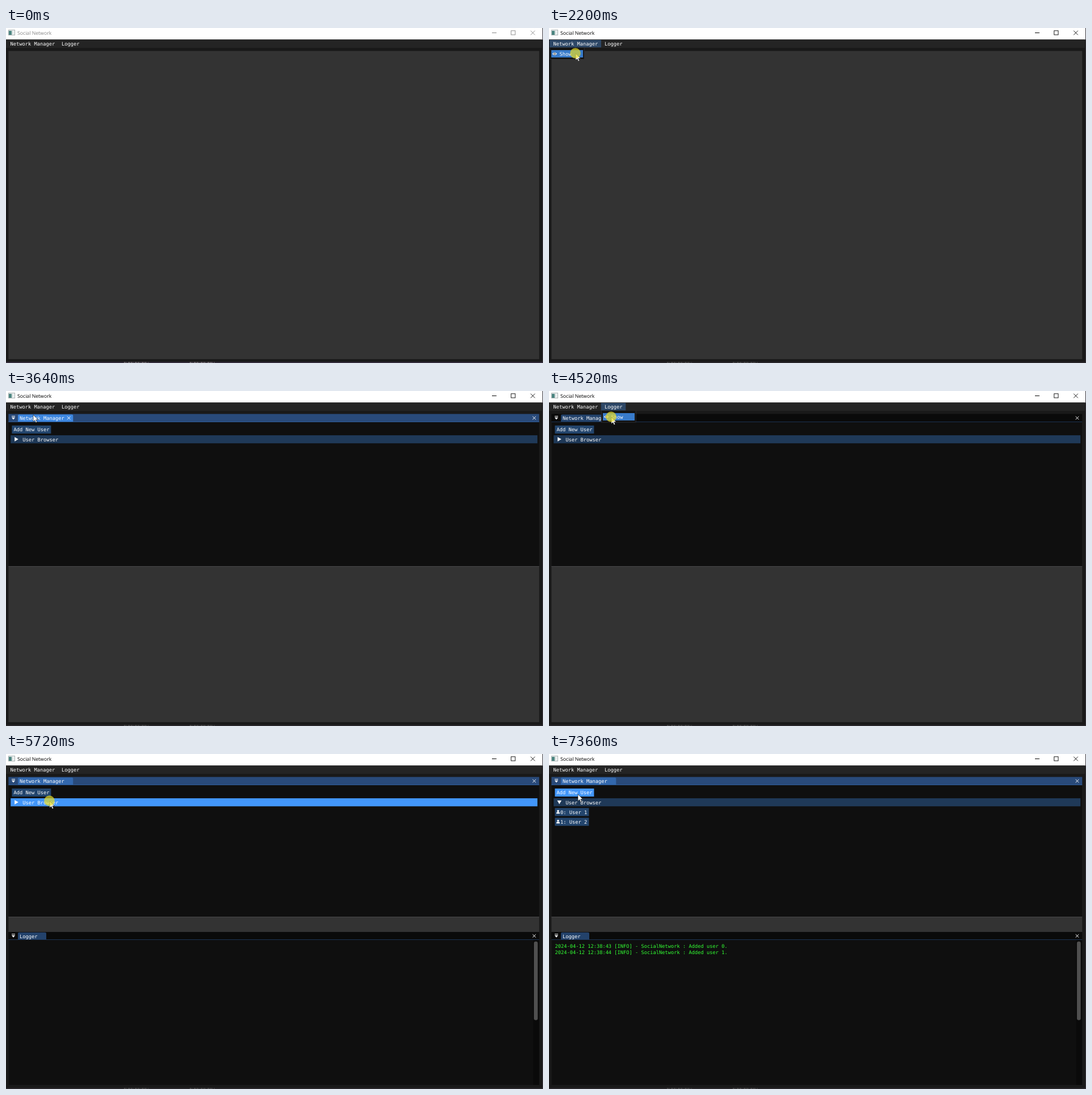
These frames come from a looping animation (947x591 px, 8000 ms). An HTML page:

```html
<!DOCTYPE html>
<html lang="en">
<head>
<meta charset="utf-8">
<title>Social Network</title>
<style>
  html, body { margin: 0; width: 100%; height: 100%; overflow: hidden; background: #191919; }
  svg { display: block; width: 947px; height: 591px; }
  text { font: 8.72px "DejaVu Sans Mono", monospace; fill: #fff; white-space: pre; text-rendering: geometricPrecision; }
  .title { font: 8.7px "Open Sans", sans-serif; }
  .log { fill: #3f3; }
</style>
</head>
<body>
<svg id="stage" viewBox="0 0 947 591"></svg>
<script>
const LOOP = 8000;
const TICK = 80;   // pointer sampling, ms
const ROW = 17.2;  // distance between widget rows
const BOX = 14.2;  // widget height
const stage = document.getElementById('stage');

// Pointer moves: start, end, goal
const entry = { x: 960, y: 650 };
const moves = [
  { from: 280, to: 1000, x: 57, y: 26 },
  { from: 1520, to: 1800, x: 47, y: 45 },
  { from: 2720, to: 2920, x: 50, y: 70 },
  { from: 3320, to: 3400, x: 50, y: 78 },
  { from: 3640, to: 3640, x: 48, y: 42 },
  { from: 3720, to: 3920, x: 110, y: 28 },
  { from: 4200, to: 4320, x: 110, y: 46 },
  { from: 4720, to: 5440, x: 77, y: 83 },
  { from: 6120, to: 6280, x: 51, y: 71 }
];

// Clicks: press and release
const click = {
  managerMenu: [1200, 1320], managerShow: [2200, 2400],
  loggerMenu: [4000, 4120], loggerShow: [4520, 4640],
  expand: [5720, 5920], addFirst: [6400, 6520], addSecond: [7240, 7360]
};

const color = {
  hover: '#387bcb', open: '#2d4766', bright: '#4296fa', pressed: '#0f87fa',
  button: '#23456d', header: '#1f3958', body: '#0f0f0f', dock: '#333', edge: '#4a4a4c',
  bar: '#294a7a', barIdle: '#0a0a0a', tab: '#3368ad', tabIdle: '#23426b', tabHover: '#3d87e0'
};

const rect = (x, y, w, h, fill, more = '') =>
  `<rect x="${x}" y="${y}" width="${w}" height="${h}" fill="${fill}" ${more}/>`;
const text = (x, y, s, more = '') => `<text x="${x}" y="${y}" ${more}>${s}</text>`;
const path = (d, fill = '#fff', stroke = 'none', width = 1) =>
  `<path d="${d}" fill="${fill}" stroke="${stroke}" stroke-width="${width}"/>`;
const circle = (x, y, r, fill, more = '') => `<circle cx="${x}" cy="${y}" r="${r}" fill="${fill}" ${more}/>`;
const cross = (x, y, r, stroke = '#fff', width = 1) =>
  path(`M${x - r} ${y - r}l${2 * r} ${2 * r}m0 ${-2 * r}l${-2 * r} ${2 * r}`, 'none', stroke, width);

function pointerAt(t) {
  let at = entry;
  for (const { from, to, x, y } of moves) {
    if (t < from) break;
    const steps = Math.round((to - from) / TICK) + 1;
    const done = Math.min(1, (Math.floor((t - from) / TICK) + 1) / steps);
    const k = Math.sin(done * Math.PI / 2);
    at = { x: at.x + (x - at.x) * k, y: at.y + (y - at.y) * k };
  }
  return at;
}

function titleBar(active) {
  const ink = active ? '#000' : '#858585';
  return rect(0, 0, 946, 20.4, '#fff') +
    rect(4, 3, 12, 10, '#a9b2b2') + rect(5, 4, 10, 8, '#eef2f2') +
    rect(5, 5, 5, 7, '#4c8580') + rect(11, 5, 1, 6, '#c4cccc') +
    text(20, 12, 'Social Network', `class="title" style="fill:${ink}"`) +
    rect(857, 8, 8, 1, ink) +
    rect(890.8, 4.8, 7.2, 7.2, 'none', `stroke="${ink}" stroke-width=".9"`) +
    cross(929, 8.5, 3.8, ink, .9);
}

function desktopEdge(active) {
  const scrap = x => `<path d="M${x} 590h44" stroke="${active ? '#666' : '#a29b9b'}" stroke-dasharray="3 1 1 2 4 1"/>`;
  return rect(0, 589, 947, 2, active ? '#29272b' : '#332d3b') + scrap(208) + scrap(324) +
    rect(946, 0, 1, 591, '#39373d');
}

function popup(x, hovered) {
  return rect(x, 35, 61.5, 20.5, '#36363c') + rect(x + .75, 35, 60, 19.75, '#131313') +
    (hovered ? rect(x + 3, 39, 56, 13, color.hover) : '') +
    path(`M${x + 5} 45.5q4 -5 8 0q-4 5 -8 0`) +
    circle(x + 9, 45.5, 1.5, '#fff', 'stroke="#131313" stroke-width=".8"') +
    text(x + 17.5, 48.5, 'Show');
}

// Docked panel: title strip, tab, body
function panel(y, bottom, label, tabEnd, focused, tabHovered) {
  const tabFill = tabHovered ? color.tabHover : focused ? color.tab : color.tabIdle;
  const base = y + BOX - .75;
  return rect(4.3, y, 936, bottom - y, color.body) +
    rect(4.3, y, 936, BOX, focused ? color.bar : color.barIdle) +
    path(`M21 ${base}V${y + 3}q0 -2 2 -2H${tabEnd - 2}q2 0 2 2V${base}z`, tabFill) +
    rect(4.3, base, 936, .75, focused ? color.tab : color.tabIdle) +
    rect(10, y + 3.5, 6, 1, '#fff') +
    path(`M9.8 ${y + 6}h6.4l-3.2 4z`) +
    text(24, y + 10.7, label) +
    (tabHovered ? cross(tabEnd - 7.5, y + 7.1, 2.8) : '') +
    cross(931.5, y + 7.1, 2.8);
}

function userButton(i) {
  const y = 60.9 + ROW * (i + 2);
  return rect(10.4, y, 60, BOX, color.button) +
    circle(16, y + 5.2, 1.8, '#fff') +
    path(`M13 ${y + 10}v-1q0 -2 3 -2t3 2v1z`) +
    text(20, y + 10.4, `${i}: User ${i + 1}`);
}

function scene(t) {
  const { x: px, y: py } = pointerAt(t);
  const over = (x, y, w, h) => px >= x && px < x + w && py >= y && py < y + h;
  const during = (a, b) => t >= a && t < b;
  const pressed = Object.values(click).some(([a, b]) => during(a, b));

  const managerAt = click.managerShow[1], loggerAt = click.loggerShow[1];
  const managerMenu = during(click.managerMenu[0], managerAt);
  const loggerMenu = during(click.loggerMenu[0], loggerAt);
  const managerOn = t >= managerAt, loggerOn = t >= loggerAt;
  const settling = during(loggerAt, loggerAt + TICK);  // first layout pass of the new panel
  const free = !managerMenu && !loggerMenu && !settling;
  const managerFocused = !during(click.loggerMenu[0], click.expand[0]);
  const active = t >= click.managerMenu[0];
  const opened = t >= click.expand[1];
  const users = [click.addFirst, click.addSecond].filter(c => t >= c[1]).length;

  const menuItem = (x, w, label, open) => {
    const fill = over(x, 21, w, 14) ? color.hover : open ? color.open : 'none';
    return rect(x, 21, w, 13.2, fill) + text(x + 6.3, 31, label);
  };

  let out = rect(0, 20, 947, 571, '#191919') + titleBar(active) +
    rect(0, 20.4, 945, 14.6, '#242424') + rect(4.3, 40.5, 936, 543.7, color.dock) + desktopEdge(active) +
    menuItem(1.2, 90.8, 'Network Manager', managerMenu) + menuItem(91.8, 43.5, 'Logger', loggerMenu);

  if (managerOn) {
    const bottom = loggerOn ? 287.2 : 309;
    const onButton = free && over(10, 61, 70, 14), onHeader = free && over(8, 77.5, 929, 15);
    out += panel(40.5, bottom, 'Network Manager', 118.3, managerFocused, free && over(21, 41, 97, 14)) +
      rect(4.3, bottom, 936, .9, color.edge) +
      rect(10.4, 60.9, 69, BOX, onButton ? (pressed ? color.pressed : color.bright) : color.button) +
      text(13.4, 71.3, 'Add New User') +
      rect(8.2, 60.9 + ROW, 929, BOX, onHeader ? (pressed ? color.bright : color.hover) : color.header) +
      path(opened ? 'M14.5 82h7.5l-3.75 6.6z' : 'M15.2 81.3v7.6l6.6 -3.8z') +
      text(29.2, 88.5, 'User Browser');
    for (let i = 0; i < users; i++) out += userButton(i);
  }

  if (loggerOn) {
    out += rect(4.3, 313, 936, .8, color.edge) +
      panel(313.8, 584.2, 'Logger', settling ? 59 : 71, !managerFocused, false) +
      rect(929.5, 328, 10.7, 256, color.barIdle) +
      rect(931, 330.8, 6.7, 138.7, '#4f4f4f', 'rx="3"');
    for (let i = 0; i < users; i++)
      out += text(10.4, 342.4 + 10.5 * i, `2024-04-12 12:38:4${3 + i} [INFO] - SocialNetwork : Added user ${i}.`, 'class="log"');
  }

  if (managerMenu) out += popup(1, over(1, 37, 61, 18));
  if (loggerMenu) out += popup(92, over(92, 37, 61, 18));

  out += path(`M${px} ${py}v12l2.8 -2.6l1.9 4.3l2 -.9l-1.9 -4.1h3.8z`, '#fff', '#111', .6);
  if (pressed) out += circle(px - .5, py - .5, 9.3, '#e6dc28', 'fill-opacity=".7"');
  return out;
}

let shown = '';
function frame() {
  const next = scene(performance.now() % LOOP);
  if (next !== shown) stage.innerHTML = shown = next;
  requestAnimationFrame(frame);
}
frame();
</script>
</body>
</html>
```
